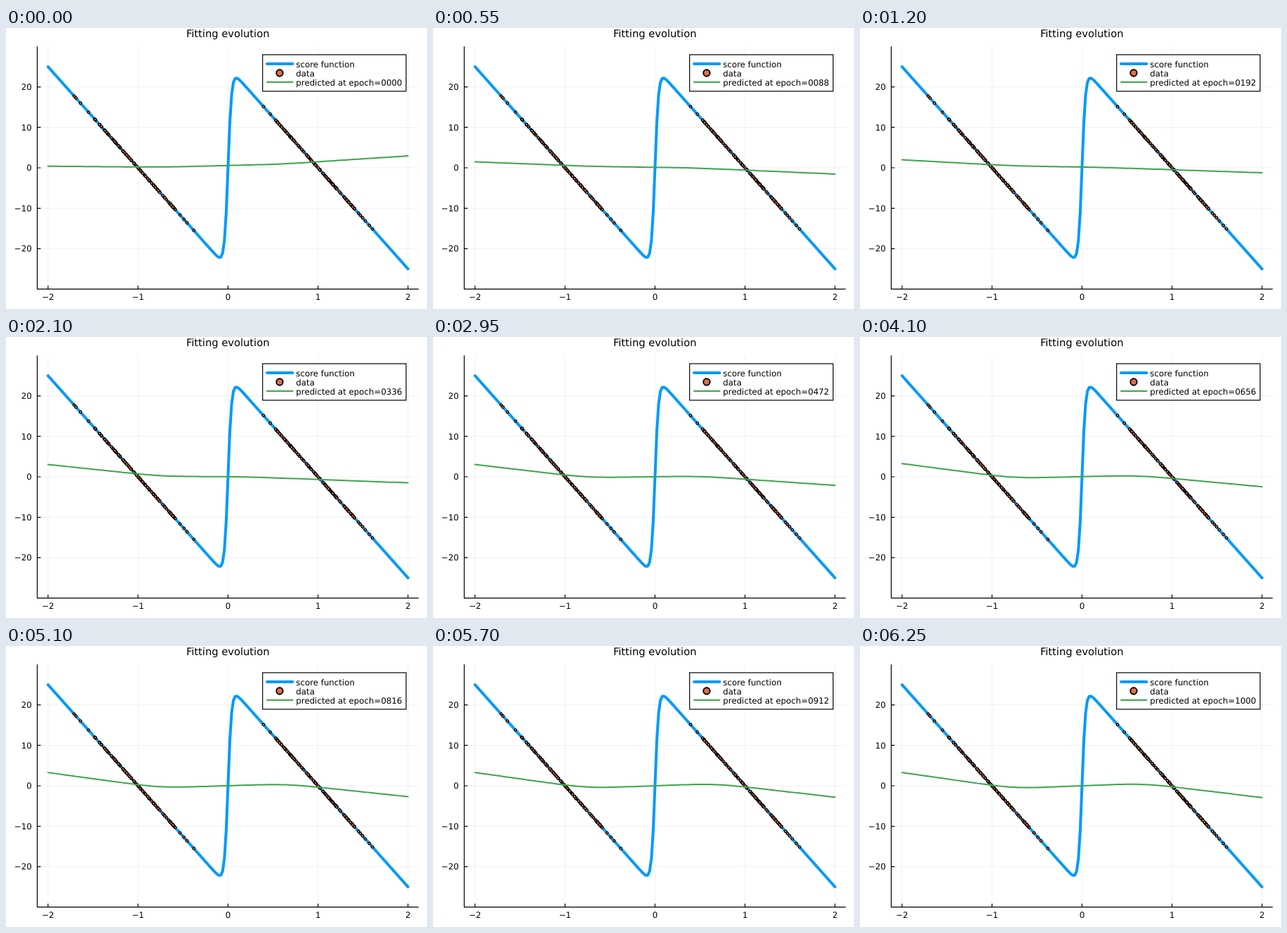
An HTML page for the animation above (6300 ms loop, 600 by 400 pixels).

```html
<!DOCTYPE html>
<html lang="en">
<head>
<meta charset="utf-8">
<title>Fitting evolution</title>
<style>
  html, body { margin: 0; width: 100%; height: 100%; overflow: hidden; background: #fff; }
  svg {
    display: block; width: 600px; height: 400px;
    font: 11.8px "DejaVu Sans", sans-serif; text-rendering: geometricPrecision;
  }
  path { fill: none; stroke-linejoin: round; }
  .grid { stroke: #000; stroke-opacity: .06; }
  .axis { stroke: #000; stroke-width: 1.2; }
  .score { stroke: #009afa; stroke-width: 4; stroke-linecap: round; }
  .fit { stroke: #3da44d; stroke-width: 2; stroke-linecap: round; }
  .dot { fill: #e26f46; stroke: #000; }
  .title { font-size: 14.7px; }
  .mid { text-anchor: middle; }
  .end { text-anchor: end; }
</style>
</head>
<body>
<svg viewBox="0 0 600 400">
  <g id="frame"></g>
  <path id="score" class="score"/>
  <g id="data"></g>
  <path id="fit" class="fit"/>
  <text class="title mid" x="316.2" y="13">Fitting evolution</text>
  <rect class="axis" x="365.7" y="38" width="204.500" height="52" style="fill:#fff"/>
  <path class="score" d="M372 51H408.500"/>
  <circle class="dot" cx="390" cy="64" r="4.7" stroke-width="1.9"/>
  <path class="fit" d="M372 77H408.500"/>
  <text x="413.300" y="55.500">score function</text>
  <text x="413.300" y="68.500">data</text>
  <text id="label" x="413.300" y="81.500"></text>
</svg>
<script>
const LOOP = 6300, STEP = 50, EPOCHS = 8;
const $ = id => document.getElementById(id);
const px = x => 316.4 + 128.25 * x;
const py = y => 199 - 5.755 * y;
const score = x => 25 * (Math.tanh(25 * x) - x);

function add(parent, tag, attrs, text = '') {
  const el = document.createElementNS('http://www.w3.org/2000/svg', tag);
  for (const k in attrs) el.setAttribute(k, attrs[k]);
  el.textContent = text;
  parent.append(el);
}

function plot(f, n) {
  let d = '';
  for (let i = 0; i <= n; i++) {
    const x = -2 + 4 * i / n;
    d += `${i ? 'L' : 'M'}${px(x).toFixed(2)} ${py(f(x)).toFixed(2)}`;
  }
  return d;
}
const minus = n => String(n).replace('-', '\u2212');

// Axes, ticks and grid
const frame = $('frame');
const left = px(-2.12), right = px(2.12), top_ = py(30), bottom = py(-30);
for (let v = -2; v <= 2; v++) {
  const x = px(v), y = py(v * 10);
  add(frame, 'path', { class: 'grid', d: `M${x} ${top_}V${bottom}M${left} ${y}H${right}` });
  add(frame, 'path', { class: 'axis', d: `M${x} ${bottom}v-5M${left} ${y}h5` });
  add(frame, 'text', { class: 'mid', x, y: 387.3 }, minus(v));
  add(frame, 'text', { class: 'end', x: 36.7, y: y + 4.3 }, minus(v * 10));
}
add(frame, 'path', { class: 'axis', d: `M${left} ${top_}V${bottom}H${right}` });
$('score').setAttribute('d', plot(score, 200));

// Samples on the score curve: a dense stretch around each mode, sparse tails
let seed = 7;
function rand() {
  seed = (seed * 16807) % 2147483647;
  return seed / 2147483647;
}
function dot(x) {
  add($('data'), 'circle', { class: 'dot', cx: px(x), cy: py(score(x)), r: 1.8, 'stroke-width': 1.2 });
}
function cluster(lo, hi, tails) {
  for (let n = 0; n < 120; n++) dot(lo + (hi - lo) * rand());
  tails.forEach(dot);
}
cluster(-1.48, -.53, [-1.71, -1.69, -1.64, -1.55, -.49, -.455, -.38]);
cluster(.52, 1.41, [.395, .47, 1.45, 1.47, 1.495, 1.525, 1.57, 1.605]);

// Fit: a line bent by a soft hinge on each side.
// Each pose: time, offset, slope, left bend, right bend, right hinge
const poses = [
  [0, .56, .55, .75, -.9, .58],
  [350, .1, -.3, .5, .75, .5],
  [1200, .19, -.35, .87, .4, .2],
  [2100, .03, -.1, 2.25, .73, .19],
  [2950, .02, .35, 2.97, 1.9, .5],
  [4100, .04, .57, 3.5, 2.63, .616],
  [6250, 0, .95, 4.15, 3.65, .68]
];
const hinge = u => .12 * Math.log(1 + Math.exp(u / .12));

function fitAt(t) {
  const i = Math.max(1, poses.findIndex(p => p[0] >= t));
  const a = poses[i - 1], b = poses[i];
  const k = (t - a[0]) / (b[0] - a[0]);
  const [, offset, slope, bendL, bendR, hingeR] = a.map((v, j) => v + (b[j] - v) * k);
  return x => offset + slope * x + bendL * hinge(-x - .75) - bendR * hinge(x - hingeR);
}

let shown = -1;
function draw() {
  const n = Math.floor(performance.now() % LOOP / STEP);
  if (n !== shown) {
    shown = n;
    $('fit').setAttribute('d', plot(fitAt(Math.min(n * STEP, 6250)), 80));
    $('label').textContent = 'predicted at epoch=' + String(n * EPOCHS).padStart(4, '0');
  }
  requestAnimationFrame(draw);
}
draw();
</script>
</body>
</html>
```
